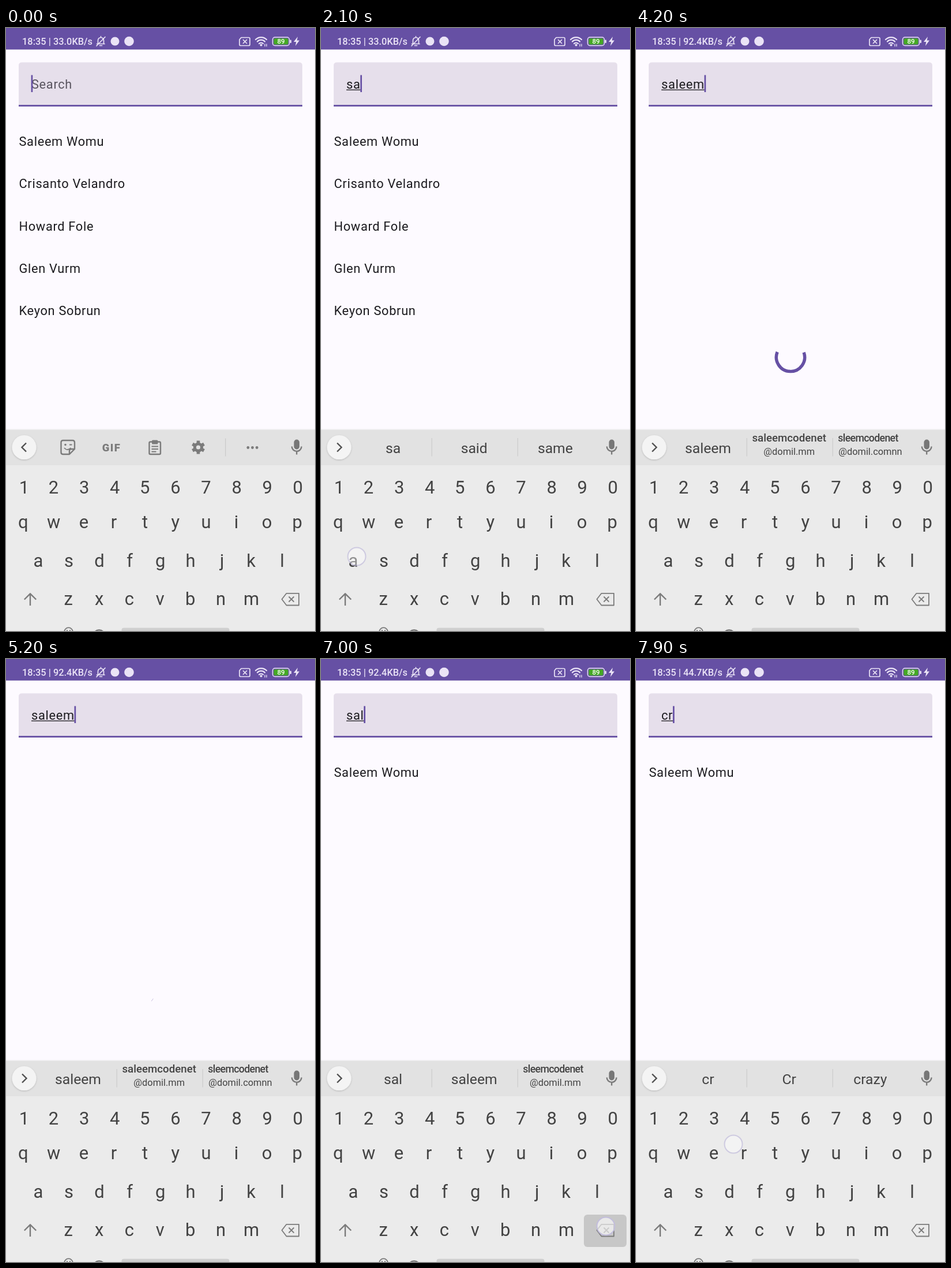
Animation of 536 by 1044 pixels, one loop 8000 ms. Source, as an HTML page:

```html
<!DOCTYPE html>
<html lang="en">
<head>
<meta charset="utf-8">
<title>Search list</title>
<style>
  html, body { margin: 0; width: 100%; height: 100%; overflow: hidden; background: #fdfaff; }
  svg { display: block; width: 536px; height: 1044px; font-family: Roboto, sans-serif; }
  .body { font-size: 21.8px; letter-spacing: .68px; fill: #1c1b1f; }
  .status { font-size: 16.4px; font-weight: 500; fill: #eae3f6; }
  .key { font-size: 31px; fill: #434343; text-anchor: middle; }
  .word { font-size: 24.7px; fill: #434343; text-anchor: middle; }
  .user { font-size: 18.7px; font-weight: 500; fill: #434343; text-anchor: middle; }
  .tight { font-size: 17.8px; letter-spacing: -.7px; }
  .host { font-size: 16.4px; fill: #434343; text-anchor: middle; }
  .line { fill: none; stroke: #7b7b7b; stroke-width: 2.4; stroke-linejoin: round; }
  .fine { stroke-width: 1.8; }
  .thin { fill: none; stroke: #eae3f6; stroke-width: 1.7; stroke-linejoin: round; stroke-linecap: round; }
</style>
</head>
<body>
<svg viewBox="0 0 536 1044">
  <defs>
    <filter id="soft" x="-30%" y="-30%" width="160%" height="160%">
      <feDropShadow dx="0" dy="1" stdDeviation="1.5" flood-opacity=".2"/>
    </filter>
  </defs>
  <rect width="536" height="1044" fill="#fdfaff"/>

  <!-- status bar -->
  <rect width="536" height="37.300" fill="#6650a4"/>
  <text id="speed" class="status" x="28" y="29"></text>
  <g class="thin">
    <path d="M157.500 27.500h13.500M159.500 27v-5.500a5 5 0 0 1 10 0V27M164.500 16v-1.500M162.500 30.500h4M157 31L172 15.500"/>
    <path d="M408 16.500H421q2 0 2 2v10q0 2-2 2H407q-2 0-2-2V20zM411.500 20.500l6 6M417.500 20.500l-6 6"/>
    <path d="M433 20a13.500 13.500 0 0 1 19 0M436 23.500a9 9 0 0 1 13 0M439 27a5 5 0 0 1 7 0" stroke-width="2.300"/>
    <path d="M449 28v3.500M452 28v3.500" stroke-width="1.300"/>
    <rect x="462.500" y="16" width="29" height="14.500" rx="4" stroke-width="1.500"/>
  </g>
  <g fill="#eae3f6">
    <circle cx="189" cy="23" r="7.500"/>
    <circle cx="213.500" cy="23" r="8.300"/>
    <circle cx="442.500" cy="29.500" r="2"/>
    <rect x="492.500" y="20.500" width="2.500" height="5.500" rx="1"/>
    <path d="M506 15l-7 9h4.300l-1.300 7 7-9.500h-4.300z"/>
  </g>
  <rect x="464.500" y="18" width="25" height="10.500" rx="2.200" fill="#45a825"/>
  <text x="477" y="27.300" font-size="11.500" font-weight="500" text-anchor="middle" fill="#fff">89</text>

  <!-- search field -->
  <path d="M22 135.800V65q0-5.500 5.500-5.500H508.500q5.500 0 5.500 5.500V135.800z" fill="#e6dfeb"/>
  <rect x="22" y="133.100" width="492" height="2.800" fill="#6650a4"/>
  <text id="hint" class="body" x="44" y="104.800" style="fill:#5a5560">Search</text>
  <text id="query" class="body" x="44" y="104.800"></text>
  <rect id="under" x="44" y="106.500" height="1.300" fill="#1c1b1f"/>
  <rect id="caret" y="81.500" width="2.700" height="29.500" fill="#6650a4"/>

  <g id="list" class="body"></g>
  <path id="spin" fill="none" stroke="#6650a4" stroke-width="5.450"/>

  <!-- keyboard -->
  <rect y="695" width="536" height="349" fill="#ebebeb"/>
  <rect y="695" width="536" height="62" fill="#e2e2e2"/>
  <rect y="694.500" width="536" height="1.500" fill="#ececee"/>
  <circle cx="31.500" cy="726" r="21" fill="#f4f4f4" filter="url(#soft)"/>
  <path id="chevron" fill="none" stroke="#505050" stroke-width="2.400"/>
  <g fill="#777">
    <rect x="499.500" y="712.500" width="9.500" height="17" rx="4.700"/>
    <path class="line" d="M495.800 724.500a8.400 8.400 0 0 0 16.800 0M504.200 733v5.500"/>
  </g>

  <g id="tools" fill="#7b7b7b">
    <path class="line" d="M99 714H115.500q3.500 0 3.500 3.500V729l-9 9H99q-3.500 0-3.500-3.500V717.500q0-3.500 3.500-3.500zM119 729h-6q-3 0-3 3v6"/>
    <path class="line fine" d="M101 727q5.500 6 11.500 0M110 721.500h4.500"/>
    <circle cx="103" cy="721.500" r="1.800"/>
    <text x="183" y="732.800" font-size="18.500" font-weight="900" letter-spacing="1.400" text-anchor="middle">GIF</text>
    <rect class="line" x="248.500" y="716.500" width="19.500" height="21.500" rx="2"/>
    <rect x="253" y="713.500" width="10.500" height="7" rx="1.500"/>
    <path class="line fine" d="M252.500 724.500h11.500M252.500 729h11.500M252.500 733.500h8"/>
    <circle cx="333.500" cy="726" r="6.100" fill="none" stroke="#7b7b7b" stroke-width="5"/>
    <g id="teeth"></g>
    <rect x="380" y="710.500" width="1.300" height="31" fill="#cbcbcb"/>
    <circle cx="419.800" cy="726.500" r="2.400"/>
    <circle cx="427.500" cy="726.500" r="2.400"/>
    <circle cx="435.200" cy="726.500" r="2.400"/>
  </g>

  <g id="words"></g>

  <g id="keys" class="key"></g>
  <rect id="press" x="456" y="962" width="74" height="56" rx="6" fill="#c7c7c7"/>
  <path class="line" d="M42 1000V979M31.800 989.500L42 979.300L52.200 989.500"/>
  <path class="line fine" d="M478.500 989L486.500 978.800H508V999.500H486.500zM490.500 984.500l9 9M499.500 984.500l-9 9"/>
  <circle class="line fine" cx="108.500" cy="1045.500" r="7.300"/>
  <circle class="line" cx="161.500" cy="1052" r="9.800"/>
  <circle cx="106" cy="1043" r="1.100" fill="#7b7b7b"/>
  <circle cx="111" cy="1043" r="1.100" fill="#7b7b7b"/>
  <rect x="200.500" y="1038.500" width="187" height="20" rx="4" fill="#cfcfcf"/>

  <circle id="touch" r="15.500" fill="#fff" fill-opacity=".6" stroke="#c2bddc" stroke-width="2"/>
</svg>
<script>
const LOOP = 8000, LOAD_START = 3874, LOAD_END = 5380;
const people = ['Saleem Womu', 'Crisanto Velandro', 'Howard Fole', 'Glen Vurm', 'Keyon Sobrun'];

// [time, field text]; the first time sets the caret phase
const edits = [
  [-200, ''], [1900, 's'], [2100, 'sa'], [2400, 'sal'], [2600, 'sale'], [2780, 'salee'],
  [2900, 'saleem'], [6580, 'salee'], [6900, 'sale'], [7000, 'sal'], [7100, 'sa'],
  [7200, 's'], [7300, ''], [7590, 'c'], [7850, 'cr']
];
const speeds = [[0, '33.0'], [3600, '92.4'], [7600, '44.7']];

// [from, to, x, y, strength]
const touches = [
  [1700, 1980, 114, 913, .7], [1990, 2190, 62, 915, .7], [2270, 2490, 476, 916, .7],
  [2500, 2800, 143, 846, .7], [2810, 3090, 430, 976, .7], [6480, 7360, 494, 982, 1],
  [7460, 7680, 219, 977, .7], [7700, 8000, 169, 840, .7]
];

const shortMail = 'sleemcodenet@domil.mm';
const hints = {
  s: ['s', 'so', 'see'],
  sa: ['sa', 'said', 'same'],
  sal: ['sal', 'saleem', shortMail],
  sale: ['sale', 'saleem', shortMail],
  salee: ['salee', 'saleem', shortMail],
  saleem: ['saleem', 'saleemcodenet@domil.mm', 'sleemcodenet@domil.comnn'],
  c: ['c', 'C', 'can'],
  cr: ['cr', 'Cr', 'crazy']
};

const $ = id => document.getElementById(id);
const show = (el, on) => { el.style.display = on ? '' : 'none'; };
const latest = (list, t) => list.filter(e => e[0] <= t).pop();
const label = (x, y, s, cls = '') => `<text x="${x}" y="${y}" class="${cls}">${s}</text>`;

$('list').innerHTML = people.map((p, i) => label(22.5, 203.8 + 73.4 * i, p)).join('');
const rows = [...$('list').children];

// Keys are centred on the visible shape of each letter, not on its advance.
const pen = document.createElement('canvas').getContext('2d');
pen.font = '31px Roboto, sans-serif';
pen.textAlign = 'center';
function inkShift(c) {
  const m = pen.measureText(c);
  return (m.actualBoundingBoxLeft - m.actualBoundingBoxRight) / 2;
}
const keyRow = (chars, x, y) =>
  [...chars].map((c, i) => label(x + 52.9 * i + inkShift(c), y, c)).join('');
$('keys').innerHTML = keyRow('1234567890', 29.8, 805.7) + keyRow('qwertyuiop', 29.5, 866.1) +
  keyRow('asdfghjkl', 56, 932.5) + keyRow('zxcvbnm', 108.5, 999);

$('teeth').innerHTML = [0, 60, 120].map(a =>
  `<rect x="330.700" y="714.500" width="5.600" height="5" transform="rotate(${a} 333.500 726)"/>` +
  `<rect x="330.700" y="732.500" width="5.600" height="5" transform="rotate(${a} 333.500 726)"/>`).join('');

function suggestion(s, i) {
  const x = 125 + 140.7 * i;
  const [user, host] = s.split('@');
  if (!host) return label(x, 735.5, s, 'word');
  return label(i === 2 ? 402.5 : x, 716, user, i === 2 ? 'user tight' : 'user') +
    label(x, 739, '@' + host, 'host');
}

// cubic-bezier(.4, 0, .2, 1)
function ease(p) {
  let lo = 0, hi = 1, u = .5;
  for (let i = 0; i < 24; i++) {
    u = (lo + hi) / 2;
    const x = 1.2 * u * (1 - u) ** 2 + .6 * u * u * (1 - u) + u ** 3;
    if (x < p) lo = u; else hi = u;
  }
  return 3 * u * u * (1 - u) + u ** 3;
}

function arc(ms) {
  const turn = 1332, n = Math.floor(ms / turn), p = (ms % turn) / turn;
  const head = 290 * ease(Math.min(1, p * 2));
  const tail = 290 * ease(Math.max(0, p * 2 - 1));
  const base = -90 + 216 * n + 286 * p;
  const point = deg => {
    const a = deg * Math.PI / 180;
    return `${268 + 24.6 * Math.cos(a)} ${570 + 24.6 * Math.sin(a)}`;
  };
  const sweep = Math.max(.5, head - tail);
  return `M${point(base + tail)}A24.6 24.6 0 ${sweep > 180 ? 1 : 0} 1 ${point(base + tail + sweep)}`;
}

let shown = null;
function setText(text) {
  if (text === shown) return;
  shown = text;
  const q = $('query');
  q.textContent = text;
  const w = text ? q.getComputedTextLength() : 0;
  $('under').setAttribute('width', w);
  $('caret').setAttribute('x', text ? 43.8 + w : 43.6);
  show($('hint'), !text);
  show($('tools'), !text);
  $('chevron').setAttribute('d', text ? 'M28 718.500L35.500 726L28 733.500' : 'M35 718.500L27.500 726L35 733.500');
  $('words').innerHTML = text ? hints[text].map(suggestion).join('') +
    '<path d="M192.300 710v31.500M341.300 710v31.500" stroke="#cdcdcd" stroke-width="1.300"/>' : '';
}

function draw(t) {
  const [at, text] = latest(edits, t);
  setText(text);
  show($('caret'), (t - at) % 1000 < 500);
  $('speed').textContent = `18:35 | ${latest(speeds, t)[1]}KB/s`;

  const loading = t >= LOAD_START && t < LOAD_END;
  rows.forEach((r, i) => show(r, t < LOAD_START || (t >= LOAD_END && i === 0)));
  show($('spin'), loading);
  if (loading) $('spin').setAttribute('d', arc(t - LOAD_START));

  const hit = touches.find(k => t >= k[0] && t < k[1]);
  show($('touch'), hit);
  show($('press'), hit && hit[4] === 1);
  if (hit) {
    $('touch').setAttribute('cx', hit[2]);
    $('touch').setAttribute('cy', hit[3]);
    $('touch').setAttribute('opacity', hit[4]);
  }
}

const begin = performance.now();
function tick() {
  draw((performance.now() - begin) % LOOP);
  requestAnimationFrame(tick);
}
tick();
</script>
</body>
</html>
```
